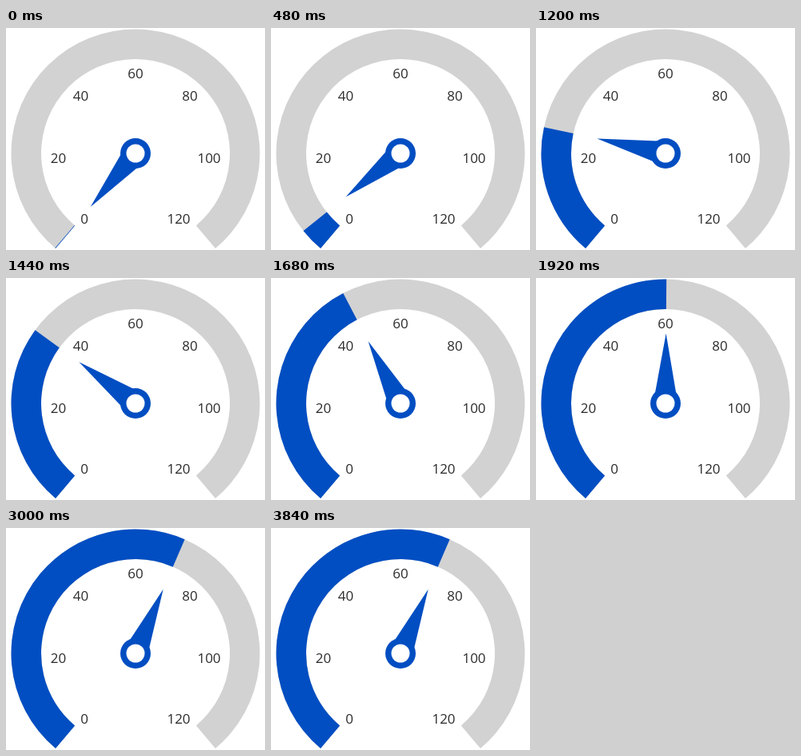
Recreate the animation shown at these times as an HTML page with a canvas. Size 324 by 278 pixels, loop 3960 ms.

```html
<!DOCTYPE html>
<html lang="en">
<head>
<meta charset="utf-8">
<title>Gauge</title>
<style>
  html, body { margin: 0; width: 100%; height: 100%; overflow: hidden; background: #fff; }
  canvas { display: block; }
</style>
</head>
<body>
<canvas id="stage" width="324" height="278"></canvas>
<script>
const ctx = document.getElementById('stage').getContext('2d');
const LOOP = 3960, STEP = 120;
const CX = 162, CY = 157, OUTER = 155.5, INNER = 118;
const BLUE = '#004ec2', GREY = '#d2d2d2', INK = '#2b2b2b';
const MAX = 120, READING = 70;
const rad = deg => deg * Math.PI / 180;
const START = rad(130), SWEEP = rad(280);
const angleOf = value => START + SWEEP * value / MAX;

const LABELS = [
  [0, 98, 239], [20, 65.5, 163], [40, 93.5, 85], [60, 162, 57],
  [80, 230, 85], [100, 254, 163], [120, 216, 239]
];

// Sine ease-in up to the reading, then hold.
function valueAt(ms) {
  const phase = Math.min(Math.PI / 2, 0.0247 + 0.000732 * ms);
  return READING * (1 - Math.cos(phase));
}

function band(from, to, color) {
  ctx.beginPath();
  ctx.arc(CX, CY, OUTER, from, to);
  ctx.arc(CX, CY, INNER, to, from, true);
  ctx.closePath();
  ctx.fillStyle = color;
  ctx.fill();
}

function disc(radius, color) {
  ctx.beginPath();
  ctx.arc(CX, CY, radius, 0, 2 * Math.PI);
  ctx.fillStyle = color;
  ctx.fill();
}

function needle(angle) {
  ctx.save();
  ctx.translate(CX, CY);
  ctx.rotate(angle);
  ctx.beginPath();
  ctx.moveTo(0, -15.4);
  ctx.lineTo(87.5, 0);
  ctx.lineTo(0, 15.4);
  ctx.closePath();
  ctx.fillStyle = BLUE;
  ctx.fill();
  ctx.restore();
}

function labels() {
  ctx.font = '17px "Open Sans", "Noto Sans", sans-serif';
  ctx.textAlign = 'center';
  ctx.textBaseline = 'alphabetic';
  ctx.fillStyle = INK;
  for (const [text, x, y] of LABELS) ctx.fillText(text, x, y + 6);
}

function draw(ms) {
  const angle = angleOf(valueAt(ms));
  ctx.fillStyle = '#fff';
  ctx.fillRect(0, 0, 324, 278);
  band(START, START + SWEEP, GREY);
  band(START, Math.max(angle, START + rad(0.3)), BLUE);
  labels();
  needle(angle);
  disc(19, BLUE);
  disc(11.5, '#fff');
}

const begin = performance.now();
function tick() {
  const ms = (performance.now() - begin) % LOOP;
  draw(Math.floor(ms / STEP) * STEP);
  requestAnimationFrame(tick);
}
tick();
</script>
</body>
</html>
```
